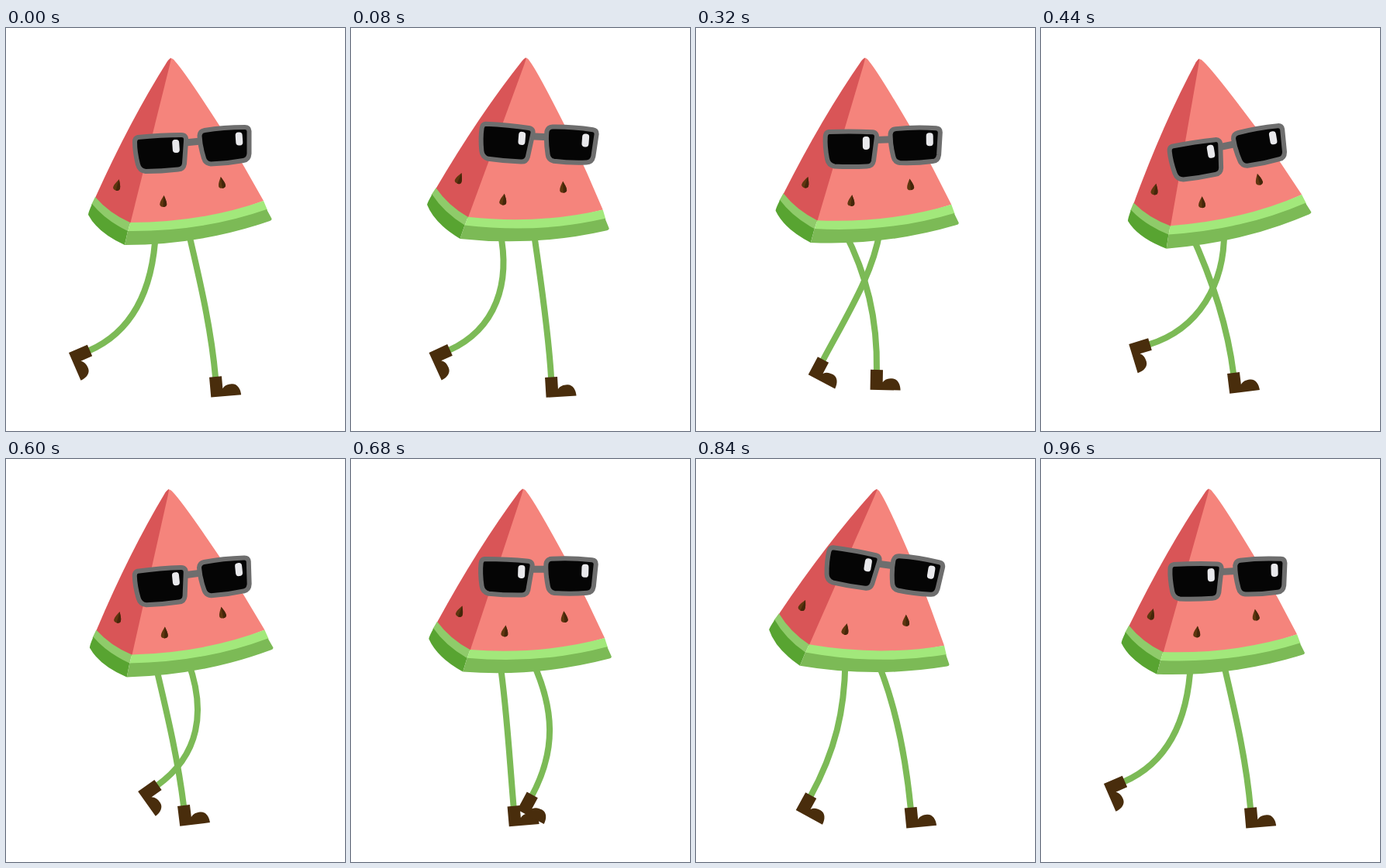
These frames come from a looping animation (437 by 520 pixels, 1000 ms). An HTML page:

```html
<!DOCTYPE html>
<html lang="en">
<head>
<meta charset="utf-8">
<title>Walking watermelon</title>
<style>
html, body { margin: 0; width: 100%; height: 100%; overflow: hidden; background: #fff; }
svg { display: block; width: 437px; height: 520px; }
.leg { fill: none; stroke: #7cba56; stroke-width: 8; }
.boot { fill: #492d0c; }
.lens { fill: #050505; stroke: #6e6e6e; stroke-width: 6; stroke-linejoin: round; }
.glint { fill: #e9e9ec; }
</style>
</head>
<body>
<svg viewBox="0 0 437 520">
  <defs>
    <g id="seed">
      <path fill="#5e360f" d="M0-8C2-4 4.5 0 4.5 3.5C4.5 8-4.5 8-4.5 3.5C-4.5 0-2-4 0-8Z"/>
      <path fill="#44260a" d="M0-8C2-4 4.5 0 4.5 3.5C4.5 6 2 7 0 7Z"/>
    </g>
    <path id="boot" class="boot" d="M0 0H16V16C19 12 23 11 28 11C35 11 39 18 39 26H0Z"/>
  </defs>

  <g id="legs"></g>

  <g id="body">
    <path fill="#f5847c" d="M210 42Q213 36 218 43Q231 57 281 135Q307 178 332 223Q252 254 159 253Z"/>
    <path fill="#d95557" d="M213 38.5Q211 39 208 43Q160 119 115 219Q133 241 160 253L211 48Z"/>
    <path fill="#8fcb6a" d="M115 218Q133 239 160 251L157 263Q128 249 110 228Z"/>
    <path fill="#58a431" d="M111 227Q128 248 157 262L153 280Q118 264 106 241Q106 238 111 227Z"/>
    <path fill="#a2e87b" d="M160 251Q252 251 332 223L337 235Q253 264 157 263Z"/>
    <path fill="#7cba56" d="M157 262Q253 263 336 234L342.5 246Q343 248 340 249Q250 280 153 280Z"/>
    <use href="#seed" transform="translate(143.5 203) rotate(16)"/>
    <use href="#seed" transform="translate(203 224) rotate(4)"/>
    <use href="#seed" transform="translate(278 200) rotate(-9)"/>
  </g>

  <g id="shades">
    <path d="M231 148L251 146" stroke="#6e6e6e" stroke-width="9"/>
    <path class="lens" d="M170 141Q200 138 226 138Q233 138 232 146L230 175Q229 182 222 182.5Q200 185 180 185Q172 184 170 176Q166 160 166 147Q166 142 170 141Z"/>
    <path class="lens" d="M256 132Q280 128 308 128Q313 128 313.5 133L313.5 162Q313 170 306 171Q285 175 264 175.5Q257 175 255 168Q250 152 249.5 139Q250 133 256 132Z"/>
    <rect class="glint" x="214.5" y="144" width="9" height="17" rx="4" transform="rotate(-4 219 152)"/>
    <rect class="glint" x="296" y="134.5" width="9" height="17" rx="4" transform="rotate(-4 300 143)"/>
  </g>
</svg>
<script>
const LOOP = 1000, STEP = 40, STRIDE = 960;
const HIP_Y = 262, SHIN = 66;

// time, tilt in degrees
const TILT = [
  [-40, -2.8], [0, 0], [160, 10.4], [180, 10.7], [320, 2.5], [440, -4.1], [500, -5.9],
  [560, -4.1], [600, -1.3], [760, 8.8], [800, 10.2], [960, 1.75], [1000, -0.5]
];

// time, hip x, knee x, knee y, foot x, foot y, foot angle
const BACK = [
  [0, 193, 190, 330, 108, 416, 66.6],
  [160, 191, 222, 325, 162, 420, 52.5],
  [320, 191, 220, 318, 233, 441, 1],
  [440, 192, 218, 318, 248, 445, -7],
  [600, 192, 205, 318, 229, 447, -7],
  [760, 192, 197, 320, 185, 445.5, 3]
];
const FRONT = [
  [0, 235, 248, 318, 270, 450, -5],
  [160, 236, 238.5, 318, 237, 448, 2],
  [320, 237, 228, 318, 164, 428, 28],
  [440, 236, 237, 330, 140.5, 408, 73],
  [600, 235, 258, 325, 196, 420.5, 54.6],
  [760, 234, 262, 320, 266, 445.5, 3]
];

// Repeat the outer keys so that a cycle joins smoothly
function cyclic(keys) {
  const move = (k, d) => [k[0] + d, ...k.slice(1)];
  return [move(keys[keys.length - 1], -STRIDE), ...keys,
          move(keys[0], STRIDE), move(keys[1], STRIDE)];
}

function slope(keys, i, c) {
  const [a, b, d] = [keys[i - 1], keys[i], keys[i + 1]];
  const h1 = b[0] - a[0], h2 = d[0] - b[0];
  return ((b[c] - a[c]) / h1 * h2 + (d[c] - b[c]) / h2 * h1) / (h1 + h2);
}

// Smooth curve through the keys, one value per column
function sample(keys, t) {
  let i = 1;
  while (i < keys.length - 3 && t >= keys[i + 1][0]) i++;
  const a = keys[i], b = keys[i + 1], h = b[0] - a[0];
  const u = (t - a[0]) / h, v = 1 - u;
  return a.slice(1).map((_, n) => {
    const c = n + 1;
    return v * v * (1 + 2 * u) * a[c] + u * u * (3 - 2 * u) * b[c] +
      h * u * v * (v * slope(keys, i, c) - u * slope(keys, i + 1, c));
  });
}

const $ = id => document.getElementById(id);

function add(tag, attrs) {
  const el = document.createElementNS("http://www.w3.org/2000/svg", tag);
  for (const k in attrs) el.setAttribute(k, attrs[k]);
  return $("legs").appendChild(el);
}

const legs = [BACK, FRONT].map(keys => ({
  keys: cyclic(keys),
  line: add("path", { class: "leg" }),
  boot: add("use", { href: "#boot" })
}));

function drawLeg({ keys, line, boot }, t) {
  const [hip, kx, ky, x, y, turn] = sample(keys, t % STRIDE);
  const r = turn * Math.PI / 180, sx = Math.sin(r), sy = Math.cos(r);
  line.setAttribute("d", `M${hip} ${HIP_Y}C${kx} ${ky} ${x + SHIN * sx} ${y - SHIN * sy} ${x - 2 * sx} ${y + 2 * sy}`);
  boot.setAttribute("transform", `translate(${x} ${y}) rotate(${turn}) translate(-8 0)`);
}

function draw(now) {
  const t = Math.floor(now % LOOP / STEP) * STEP;
  const [tilt] = sample(TILT, t);
  legs.forEach(leg => drawLeg(leg, t));
  $("body").setAttribute("transform", `rotate(${tilt} 222 161)`);
  $("shades").setAttribute("transform", `rotate(${tilt * 1.37} 288 156)`);
}

const start = performance.now();
function tick() {
  draw(performance.now() - start);
  requestAnimationFrame(tick);
}
tick();
</script>
</body>
</html>
```
